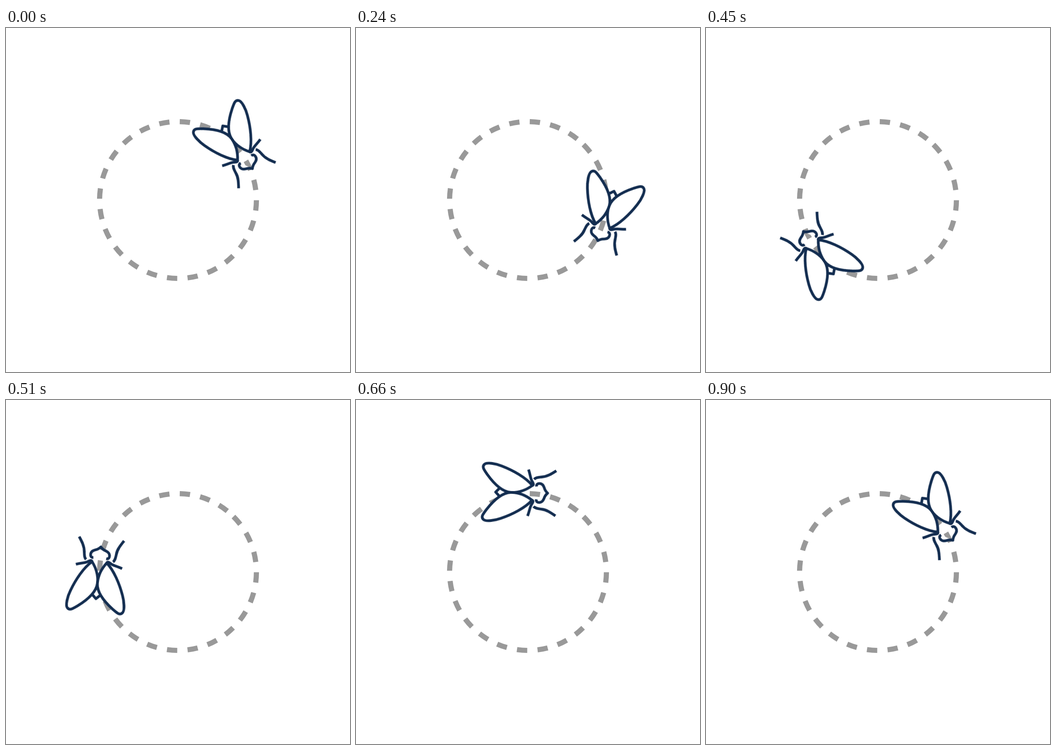
Recreate the animation shown at these times as an HTML page. Size 748 px wide and 748 px high, loop 0.93 s.

```html
<!DOCTYPE html>
<html lang="en">
<head>
<meta charset="utf-8">
<title>Fly on a ring</title>
<style>
  html, body { margin: 0; width: 100%; height: 100%; overflow: hidden; background: #fff; }
  svg { display: block; width: 748px; height: 748px; }
  .ring { fill: none; stroke: #999; stroke-width: 11.2; stroke-dasharray: 22.4 22.4; }
  .fly { fill: #fff; stroke: #132d50; stroke-width: 5.9; stroke-linejoin: round; }
  .line { fill: none; }
  .cheek { stroke: none; }
</style>
</head>
<body>
<svg viewBox="0 0 748 748">
  <defs>
    <!-- One side of the fly, facing +x -->
    <g id="side">
      <path class="line" d="M36 29.5C40 34 46 34 53 35C65 36 75 43 84 49"/>
      <path class="line" d="M23.5 50.5C28 38 28 31 31.5 25.5C34 21.5 36.5 18 32.5 16"/>
      <path d="M32.5 16C18 5 2 -.5 -14 0C-35 1 -54 22 -66 38C-73.5 48.5 -78.5 54.5 -72.5 60C-67.5 65 -48 62 -35 57C-10 48 18 33 32.5 16Z"/>
      <path class="cheek" d="M41.5 14C41 20 46 21 49.5 20.5C55 20 57 15.5 58.5 11.5C60 6.5 62 3.5 66 0Z"/>
    </g>
  </defs>
  <circle class="ring" cx="374" cy="374" r="170.5" transform="rotate(-45 374 374)"/>
  <g class="fly" id="fly">
    <g transform="translate(.5 -4)">
      <path d="M-38 -9.5L-47 0L-38 9.5"/>
      <use href="#side"/>
      <use href="#side" transform="scale(1 -1)"/>
      <path class="line" d="M41.5 14C41 20 46 21 49.5 20.5C55 20 57 15.5 58.5 11.5C60 6.5 62 3.5 66 0C62 -3.5 60 -6.5 58.5 -11.5C57 -15.5 55 -20 49.5 -20.5C46 -21 41 -20 41.5 -14"/>
    </g>
  </g>
</svg>
<script>
  const STEPS = 30, HOLD = 30, RADIUS = 170.5;

  // cubic-bezier(.42, 0, .58, 1), solved by bisection
  function easeInOut(x) {
    let lo = 0, hi = 1;
    for (let i = 0; i < 40; i++) {
      const s = (lo + hi) / 2, r = 1 - s;
      if (1.26 * r * r * s + 1.74 * r * s * s + s * s * s < x) lo = s;
      else hi = s;
    }
    return lo * lo * (3 - 2 * lo);
  }

  // Position on the ring, plus a small drift of the heading
  function pose(x) {
    const e = easeInOut(x);
    return `translate(374px, 374px) rotate(${-45 + 360 * e}deg) ` +
           `translate(${RADIUS}px, 0px) rotate(${100.2 - 1.1 * e}deg)`;
  }

  const frames = [];
  for (let k = 0; k <= STEPS; k++) {
    frames.push({ offset: k / (STEPS + 1), transform: pose(k / STEPS), easing: 'step-end' });
  }
  frames.push({ offset: 1, transform: pose(1) });

  document.getElementById('fly').animate(frames, {
    duration: HOLD * (STEPS + 1),
    iterations: Infinity
  });
</script>
</body>
</html>
```
